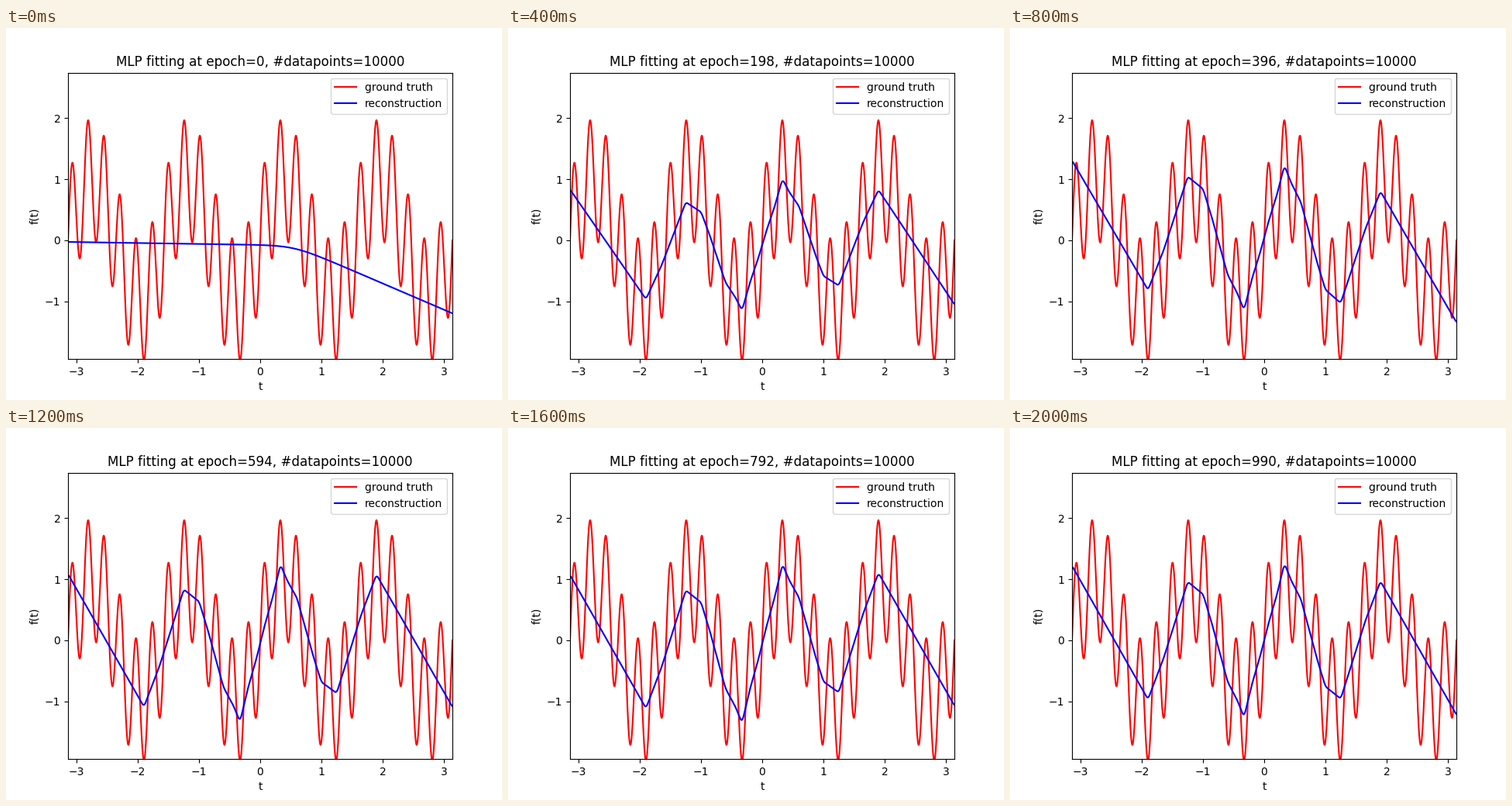
A matplotlib script that plays this animation: 640 px wide and 480 px high, repeating every 2200 ms.

```python
import numpy as np
import matplotlib.pyplot as plt
from matplotlib.animation import FuncAnimation

FRAMES, STEP_MS, EPOCH_STEP = 11, 200, 99
POINTS = 10000
LEARN_EPOCHS = 115

# Tilt of the fit as training wobbles around the solution
SWAY = [0, -0.1, -0.2, 0, 0.13, 0, -0.13, 0.15, -0.15, 0.1, 0]

t = np.linspace(-np.pi, np.pi, POINTS)
truth = np.sin(4 * t) + np.sin(24 * t)


def untrained():
    """Nearly flat line with one soft hinge."""
    hinge = 0.18 * np.log1p(np.exp((t - 0.55) / 0.18))
    return -0.027 - 0.015 * (t + np.pi) - 0.415 * hinge


def trained(corner=0.025):
    """The slow sine joined by straight pieces: odd, with long straight tails."""
    bends = np.array([0.07, 0.2, 0.33, 0.44, 0.6, 0.86, 1.0, 1.25, 1.65, 1.9, np.pi])
    heights = np.sin(4 * bends)
    heights[2] *= 1.3
    heights[-1] = -1.22
    x = np.concatenate([-bends[::-1], bends])
    y = np.concatenate([-heights[::-1], heights])
    shifts = np.linspace(-corner, corner, 7)
    return np.mean([np.interp(t + s, x, y) for s in shifts], axis=0)


START, GOAL = untrained(), trained()


def fit(i):
    learned = 1 - np.exp(-i * EPOCH_STEP / LEARN_EPOCHS)
    swayed = GOAL - SWAY[i] * np.tanh(t - 0.4)
    return START + (swayed - START) * learned


fig, ax = plt.subplots(figsize=(6.4, 4.8), dpi=100)
ax.plot(t, truth, color="red", label="ground truth")
fit_line, = ax.plot(t, START, color="blue", label="reconstruction")
ax.set_xlim(-np.pi, np.pi)
ax.set_ylim(-1.946, 2.746)
ax.set_xlabel("t")
ax.set_ylabel("f(t)")
ax.legend(loc="upper right")
title = ax.set_title("", fontsize=12.08)


def draw(i):
    fit_line.set_ydata(fit(i))
    title.set_text(f"MLP fitting at epoch={i * EPOCH_STEP}, #datapoints={POINTS}")
    return fit_line, title


anim = FuncAnimation(fig, draw, frames=FRAMES, interval=STEP_MS,
                     repeat=True, repeat_delay=0, blit=False)
plt.show()
```
